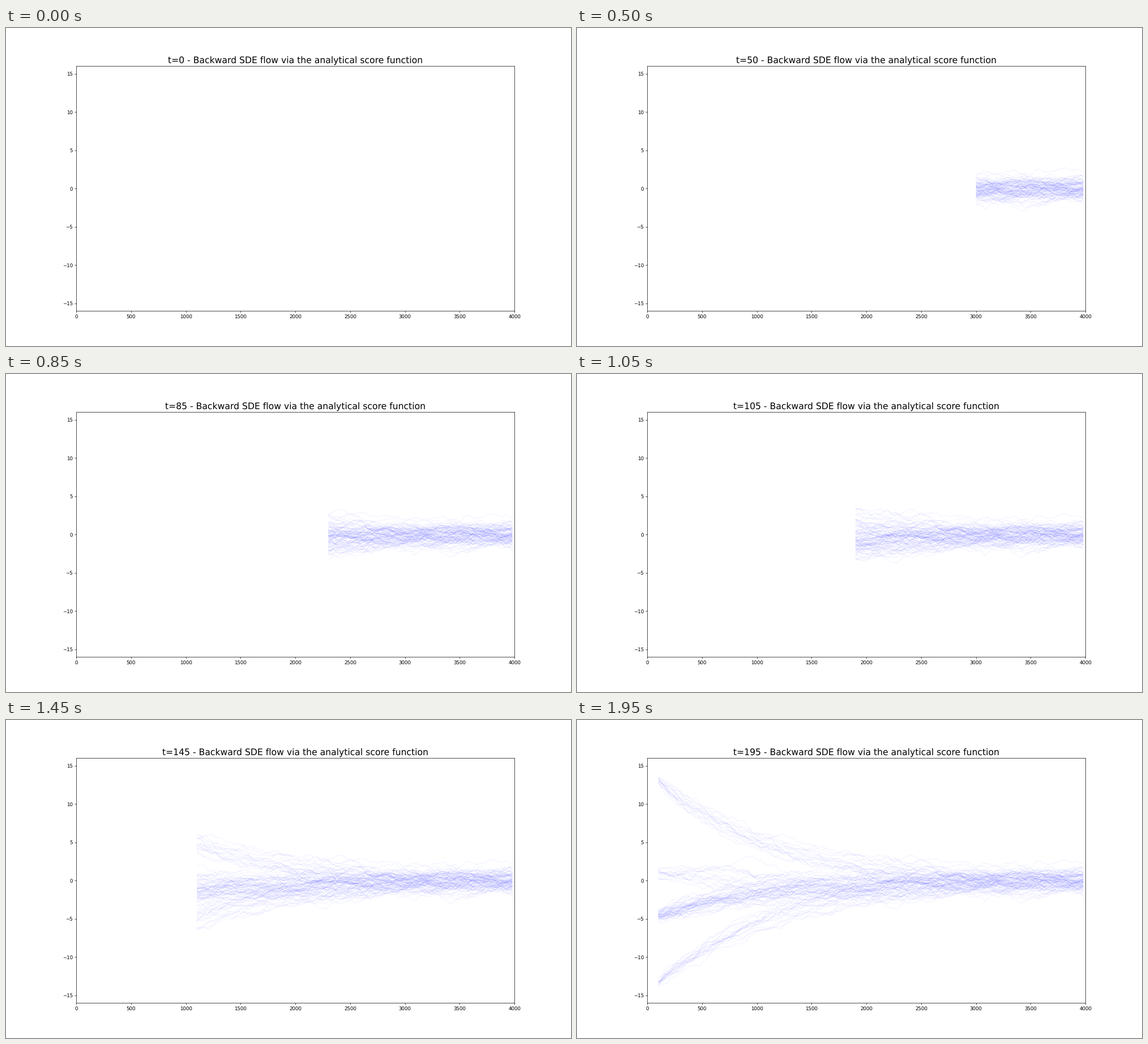
These frames come from a looping animation (998x561 px, 2000 ms). A matplotlib script:

```python
import matplotlib.pyplot as plt
import numpy as np
from matplotlib.animation import FuncAnimation
from matplotlib.collections import LineCollection

W, H, DPI = 998, 561, 62.375
FRAMES, INTERVAL = 40, 50
T_STEP = 5            # solver steps shown per frame
DX = 20               # x units per solver step
STEPS = 200
SPREAD = 0.82         # stationary standard deviation
CLUSTERS = ((14.6, 15), (1.1, 14), (-4.9, 44), (-14.6, 17))


def simulate(seed=7):
    """Ornstein-Uhlenbeck paths that leave the clusters, one row per path."""
    rng = np.random.default_rng(seed)
    decay = np.exp(-DX / 1000)
    kick = SPREAD * np.sqrt(1 - decay ** 2)
    y = np.concatenate([np.full(n, mean) for mean, n in CLUSTERS])
    paths = [y]
    for _ in range(STEPS):
        y = decay * y + kick * rng.standard_normal(y.size)
        paths.append(y)
    return np.array(paths).T


xs = np.arange(STEPS + 1) * DX
paths = simulate()

plt.rcParams["text.hinting"] = "no_hinting"
fig, ax = plt.subplots(figsize=((W + 0.01) / DPI, (H + 0.01) / DPI), dpi=DPI)
fig.subplots_adjust(left=0.1245)
ax.set_xlim(0, 4000)
ax.set_ylim(-16, 16)
ax.set_xticks(range(0, 4001, 500))
ax.set_yticks(range(-15, 16, 5))
title = ax.set_title("", fontsize=18)
lines = LineCollection([], colors="blue", linewidths=1, alpha=0.065)
ax.add_collection(lines, autolim=False)


def update(frame):
    t = frame * T_STEP
    title.set_text(f"t={t} - Backward SDE flow via the analytical score function")
    shown = slice(STEPS - t, STEPS)
    lines.set_segments([np.column_stack((xs[shown], y[shown])) for y in paths] if t else [])
    return lines, title


anim = FuncAnimation(fig, update, frames=FRAMES, interval=INTERVAL, repeat=True, repeat_delay=0)
plt.show()
```
